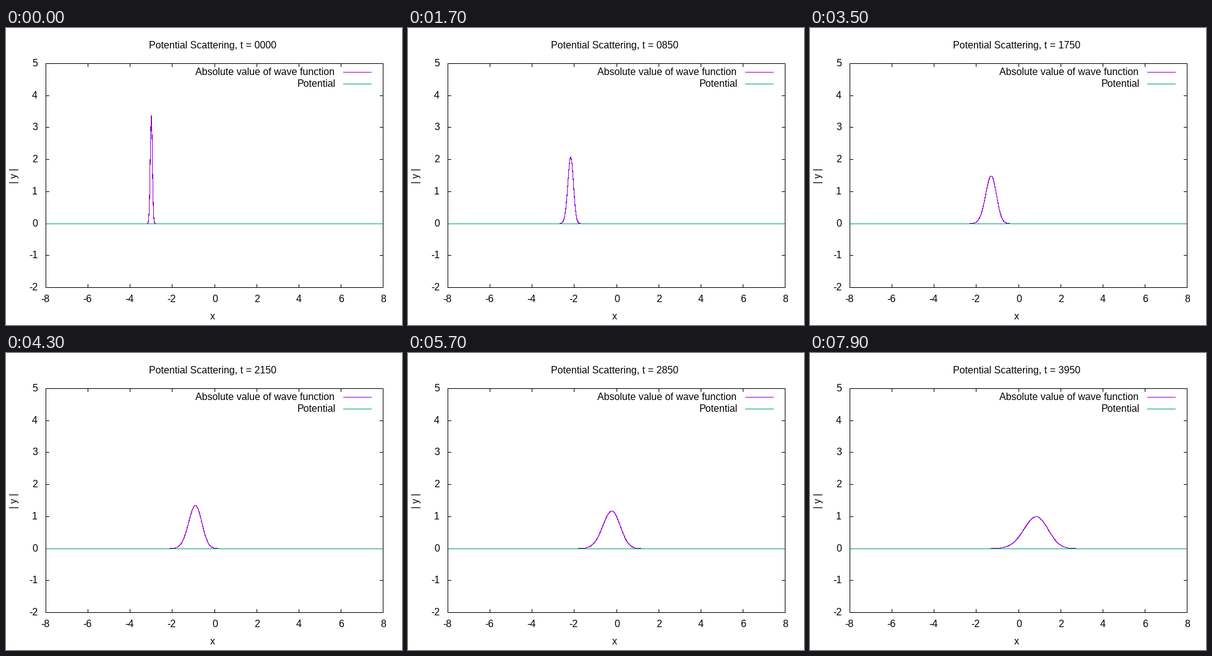
Recreate the animation shown at these times as a matplotlib script. Size 640 px wide and 480 px high, loop 8 s.

```python
import numpy as np
import matplotlib.pyplot as plt
from matplotlib.animation import FuncAnimation

W, H, DPI = 640, 480, 100
FRAMES, INTERVAL, STEP = 80, 100, 50
PX = 72 / DPI                      # one pixel in points

LEFT, RIGHT, TOP, BOTTOM = 64, 609, 57, 419
X_UNIT = (RIGHT - LEFT) / 16
Y_UNIT = (BOTTOM - TOP) / 7
Y_ZERO = 315.6
TICK = 5

PURPLE, GREEN = "#9400d3", "#009e73"

# Wave packet: start, width, height and dispersion per time step
START, SIGMA, PEAK = -3.0, 0.05, 3.37
VELOCITY = 9.7e-4
SPREAD = SIGMA ** 2 / 347
SKEW = -1.45e-8

N = 4096
xs = -8 + 16 * np.arange(N) / N
q = 2 * np.pi * np.fft.fftfreq(N, 16 / N)
envelope = np.exp(-(q * SIGMA) ** 2 / 2)
envelope *= PEAK / envelope.mean()

plt.rcParams.update({
    "font.family": "Liberation Sans",
    "font.size": 16 * PX,
    "text.hinting": "default",
    "path.simplify": False,
})

fig = plt.figure(figsize=(W / DPI, H / DPI), dpi=DPI, facecolor="white")
ax = fig.add_axes([0, 0, 1, 1])
ax.set_xlim(0, W)
ax.set_ylim(H, 0)
ax.axis("off")


def px(x):
    return np.floor(LEFT + (x + 8) * X_UNIT + 0.5)


def py(y):
    return np.floor(Y_ZERO - y * Y_UNIT + 0.5)


def line(x, y, color="black", z=1):
    """Crisp one-pixel polyline through pixel centres."""
    art, = ax.plot(np.asarray(x) + 0.5, np.asarray(y) + 0.5, color=color,
                   lw=PX, antialiased=False, snap=False, zorder=z,
                   solid_capstyle="projecting", solid_joinstyle="miter")
    return art


def label(x, y, s, **kw):
    return ax.text(x, y, s, ha="left", va="baseline", zorder=5, **kw)


def wave(t):
    phase = q * (START + 8 + VELOCITY * t) + SPREAD * t * q ** 2 / 2 \
        + SKEW * t * q ** 3 / 6
    return np.abs(np.fft.ifft(envelope * np.exp(-1j * phase)))


for v in range(-8, 9, 2):
    x = px(v)
    line([x, x], [BOTTOM - TICK, BOTTOM])
    line([x, x], [TOP, TOP + TICK])
    label(x - (8 if v < 0 else 4), 443, str(v))

for v in range(-2, 6):
    y = py(v)
    line([LEFT, LEFT + TICK], [y, y])
    line([RIGHT - TICK, RIGHT], [y, y])
    label(37 if v < 0 else 42, y + 5, str(v))

line([LEFT, RIGHT, RIGHT, LEFT, LEFT], [TOP, TOP, BOTTOM, BOTTOM, TOP], z=4)

label(330, 471, "x")
label(18, 251, "| y |", rotation=90, rotation_mode="anchor")

label(306, 76, "Absolute value of wave function")
line([545, 590], [71, 71], PURPLE)
label(471, 95, "Potential")
line([545, 590], [90, 90], GREEN)

curve = line(px(xs), py(0 * xs), PURPLE, 2)
line([LEFT, RIGHT], [py(0), py(0)], GREEN, 3)
title = label(231, 33, "")


def update(i):
    t = i * STEP
    curve.set_ydata(py(wave(t)) + 0.5)
    text = f"{t:04d}"
    title.set_text("Potential Scattering, t = " + text)
    # the kerned "11" pair narrows the centred title
    title.set_x(232 if "11" in text else 231)
    return curve, title


anim = FuncAnimation(fig, update, frames=FRAMES, interval=INTERVAL,
                     repeat=True, repeat_delay=0)
plt.show()
```
